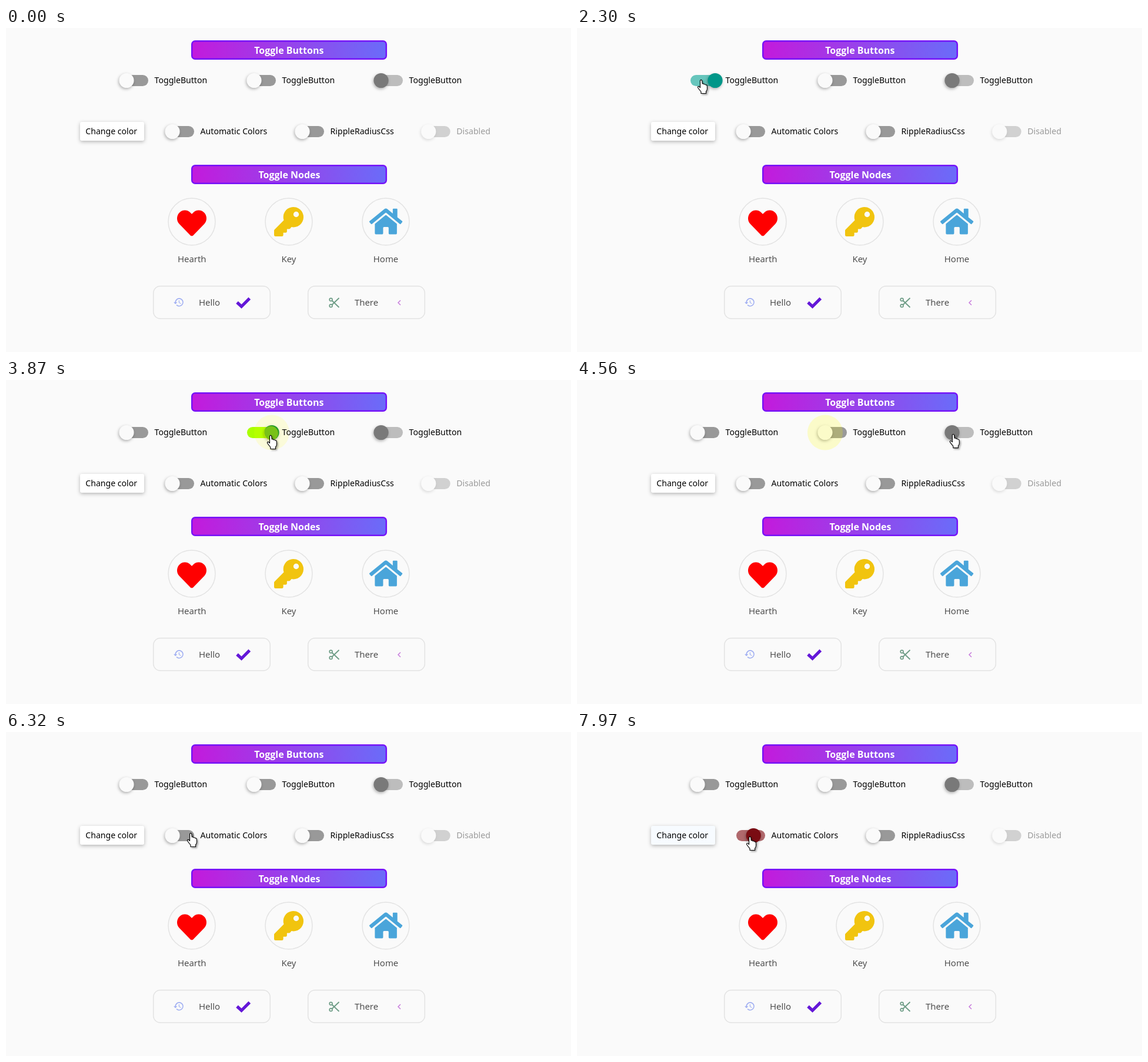
An HTML page for the animation above (7990 ms loop, 961 px wide and 552 px high).

```html
<!DOCTYPE html>
<html lang="en">
<head>
<meta charset="utf-8">
<title>Toggles</title>
<style>
html, body { margin: 0; width: 100%; height: 100%; overflow: hidden; background: #fafafa }
svg { display: block; width: 961px; height: 552px }
.label { font: 14.1px "Noto Sans", sans-serif }
.node { font: 15px "Open Sans", sans-serif; fill: #444; text-anchor: middle }
.title { font: bold 16px "Open Sans", sans-serif; fill: #fff; text-anchor: middle }
.thumb { filter: drop-shadow(-1px 2px 2.5px rgba(0,0,0,.3)) }
.card { filter: drop-shadow(0 2px 3px rgba(0,0,0,.28)) }
.pointer { fill: #fff; stroke: #000; stroke-width: 1.1; stroke-linejoin: round; filter: drop-shadow(2px 2px 1.5px rgba(0,0,0,.35)) }
.line { fill: none; stroke: #e3e3e3; stroke-width: 1.5 }
</style>
</head>
<body>
<svg viewBox="0 0 961 552">
  <defs>
    <linearGradient id="bar"><stop stop-color="#c31adc"/><stop offset="1" stop-color="#6a6cf9"/></linearGradient>
    <clipPath id="card"><rect x="126" y="160" width="109" height="32" rx="3"/></clipPath>
  </defs>

  <g fill="url(#bar)" stroke="#7613f8" stroke-width="2.5">
    <rect x="316.2" y="22.2" width="330.6" height="30.6" rx="5.5"/>
    <rect x="316.2" y="234.2" width="330.6" height="30.6" rx="5.5"/>
  </g>
  <g class="title"><text x="481.3" y="44">Toggle Buttons</text><text x="482" y="256">Toggle Nodes</text></g>

  <g class="line" stroke-width="2">
    <circle cx="316" cy="330" r="40"/><circle cx="481" cy="330" r="40"/><circle cx="646" cy="330" r="40"/>
    <rect x="250.7" y="439.7" width="198.6" height="55.6" rx="12"/>
    <rect x="513.7" y="439.7" width="198.6" height="55.6" rx="12"/>
  </g>
  <path fill="red" transform="translate(291 307.5) scale(.0977)" d="M462 63C407 16 326 24 276 76L256 96 236 76C186 24 104 16 50 63-13 116-16 212 40 270L233 470c13 13 33 13 46 0L472 270C528 212 525 116 462 63Z"/>
  <path fill="#f1c40f" transform="translate(456 305) scale(.0977)" d="M512 176A176 176 0 0 1 303 349L279 376Q272 384 261 384H224V424Q224 448 200 448H160V488Q160 512 136 512H24Q0 512 0 488V410Q0 400 7 393L169 231A176 176 0 1 1 512 176ZM336 128a48 48 0 1 0 96 0 48 48 0 1 0-96 0Z"/>
  <path fill="#4aa5da" transform="translate(618 304.5) scale(.0977)" d="M280 148L96 300V464q0 16 16 16H224q16 0 16-16V368q0-16 16-16h64q16 0 16 16v96q0 16 16 16H464q16 0 16-16V300L296 148q-8-6-16 0ZM572 251L488 183V44q0-12-12-12H420q-12 0-12 12V117L318 43q-30-23-60 0L4 251q-8 8-2 17l26 31q8 9 17 2L280 107q8-6 16 0L531 301q9 7 17-2l25-31q7-9-1-17Z"/>

  <path fill="#a0aff2" transform="translate(284.2 457.7) scale(.8)" d="M13 3a9 9 0 0 0-9 9H1l4 4 4-4H6a7 7 0 1 1 2 5l-1.4 1.4A9 9 0 1 0 13 3zm-1 5v5l4.3 2.5.7-1.2-3.5-2V8z"/>
  <g fill="none">
    <path stroke="#6417d8" stroke-width="5.2" d="M393 467.5L400.5 474.500 414.300 460.700"/>
    <path stroke="#6f9d87" stroke-width="1.9" d="M554 464L566.500 476M554 472L566.500 460"/>
    <g stroke="#6f9d87" stroke-width="1.7"><circle cx="552.6" cy="462.700" r="2.400"/><circle cx="552.6" cy="473.300" r="2.400"/></g>
    <path stroke="#c77bdc" stroke-width="1.5" d="M671 464L667 468 671 472"/>
  </g>
  <g class="node">
    <text x="316.2" y="399">Hearth</text><text x="481" y="399">Key</text><text x="646" y="399">Home</text>
    <text x="346" y="473">Hello</text><text x="613" y="473">There</text>
  </g>

  <rect class="card" x="126" y="160" width="109" height="32" rx="3" fill="#fff"/>
  <g id="moving"></g>
  <g class="label" id="labels"><text x="135.3" y="181">Change color</text></g>
  <path id="pointer" class="pointer"/>
</svg>
<script>
const LOOP = 7990, MOVE = 150, TRAVEL = 30;
const teal = { thumb: '#009688', track: '#66c5bc' };
const maroon = { thumb: '#7a0c13', track: '#b0696d' };
const grey = { thumb: '#fafafa', track: '#999' };

// flips: moments at which the toggle changes state, starting from off
const toggles = [
  { x: 205, y: 89.5, text: 'ToggleButton', on: [teal], ripple: '#009688', flips: [1525, 2330] },
  { x: 422, y: 89.5, text: 'ToggleButton', on: [{ thumb: '#008a2e', track: '#aaff00' }], ripple: '#ffff00', flips: [3610, 4080] },
  { x: 638, y: 89.5, text: 'ToggleButton', on: [{ thumb: '#ae00ff', track: '#ff00ff' }], off: { thumb: '#797979', track: '#bdbdbd' }, ripple: '#ff00ff', flips: [4780, 5400] },
  { x: 283, y: 176.5, text: 'Automatic Colors', on: [teal, maroon], ripple: '#009688', flips: [6420, 7065, 7885] },
  { x: 504, y: 176.5, text: 'RippleRadiusCss', flips: [] },
  { x: 718.7, y: 176.5, text: 'Disabled', dim: true, flips: [] }
];

// time, x, y of the pointer tip
const path = [
  [900, 257, 3], [1030, 264, 50], [1150, 245, 114], [1290, 211, 88], [2500, 211, 88],
  [3000, 446, 105], [3300, 446, 105], [3550, 450, 94], [4180, 450, 94], [4640, 656, 92],
  [4800, 656, 85], [5560, 656, 85], [6260, 317, 172], [6420, 308, 172], [6640, 306, 172],
  [7050, 193, 173], [7320, 193, 173], [7600, 315, 182], [7800, 296, 179], [LOOP, 294, 178]
];
const arrowTimes = [[900, 1220], [2680, 2920], [4330, 4560], [5700, 6220], [6720, 7530]];
const ARROW = 'M0 0V16.500L4 13 6.600 19 9.200 17.800 6.700 12H12Z';
const HAND = 'M-1.500 1.500Q0-.8 1.600 1.500L2.200 7Q4 6 5 8 7 7.200 8 9 10 8.500 10.300 11L10.500 15Q10.500 18 8.500 20V23.500H0V20.500Q-3 17-5.500 13.500-6 11-3.500 11.500L-1.500 13.500Z';

const byId = id => document.getElementById(id);
const clamp = v => Math.max(0, Math.min(1, v));
const smooth = v => v * v * (3 - 2 * v);
const disc = (x, y, r, fill, more = '') => `<circle cx="${x}" cy="${y}" r="${r}" fill="${fill}" ${more}/>`;

byId('labels').innerHTML += toggles.map(g =>
  `<text x="${g.x + 47.6}" y="${g.y + 4.5}" fill="${g.dim ? '#999' : '#000'}">${g.text}</text>`).join('');

function drawRipple(g, index, t) {
  const age = t - g.flips[index] - 120, left = 1 - age / 500;
  if (age < 0 || left <= 0) return '';
  const grow = clamp(age / 350), lag = 2 * (1 - grow);
  const x = g.x + (index % 2 ? 0 : TRAVEL);
  return disc(x, g.y, 30, g.ripple, `opacity="${.18 * left}"`) +
    disc(x - lag, g.y + lag, 30 * grow, g.ripple, `opacity="${.55 * left}"`);
}

function drawToggle(g, t) {
  const count = g.flips.filter(f => f <= t).length, isOn = count % 2;
  const look = isOn ? g.on[count >> 1] : g.off || grey;
  const step = count ? clamp((t - g.flips[count - 1]) / MOVE) : 1;
  const shift = TRAVEL * (isOn ? step : count ? 1 - step : 0);
  return `<g opacity="${g.dim ? .42 : 1}"><rect x="${g.x - 12}" y="${g.y - 9.5}" width="49" height="19" rx="9.5" fill="${look.track}"/>` +
    disc(g.x + shift, g.y, 12.6, look.thumb, 'class="thumb"') + '</g>' +
    g.flips.map((_, i) => drawRipple(g, i, t)).join('');
}

function drawPress(t) {
  const age = t - 7040;
  if (age < 0) return '';
  return `<g clip-path="url(#card)"><rect x="126" y="160" width="109" height="32" fill="#2196f3" opacity="${.23 * clamp(1 - age / 1100)}"/>` +
    disc(188, 176, Math.min(110, age * .315), '#2196f3', `opacity="${.8 * clamp(1 - age / 500)}"`) + '</g>';
}

function placePointer(t) {
  const pointer = byId('pointer');
  pointer.style.display = t < path[0][0] ? 'none' : '';
  const i = path.findIndex(p => p[0] > t);
  if (i < 1) return;
  const [t0, x0, y0] = path[i - 1], [t1, x1, y1] = path[i];
  const k = smooth((t - t0) / (t1 - t0));
  const isArrow = arrowTimes.some(([a, b]) => t >= a && t < b);
  pointer.setAttribute('d', isArrow ? ARROW : HAND);
  pointer.setAttribute('transform', `translate(${x0 + (x1 - x0) * k} ${y0 + (y1 - y0) * k})`);
}

const start = performance.now();
function draw() {
  const t = (performance.now() - start) % LOOP;
  byId('moving').innerHTML = drawPress(t) + toggles.map(g => drawToggle(g, t)).join('');
  placePointer(t);
  requestAnimationFrame(draw);
}
draw();
</script>
</body>
</html>
```
